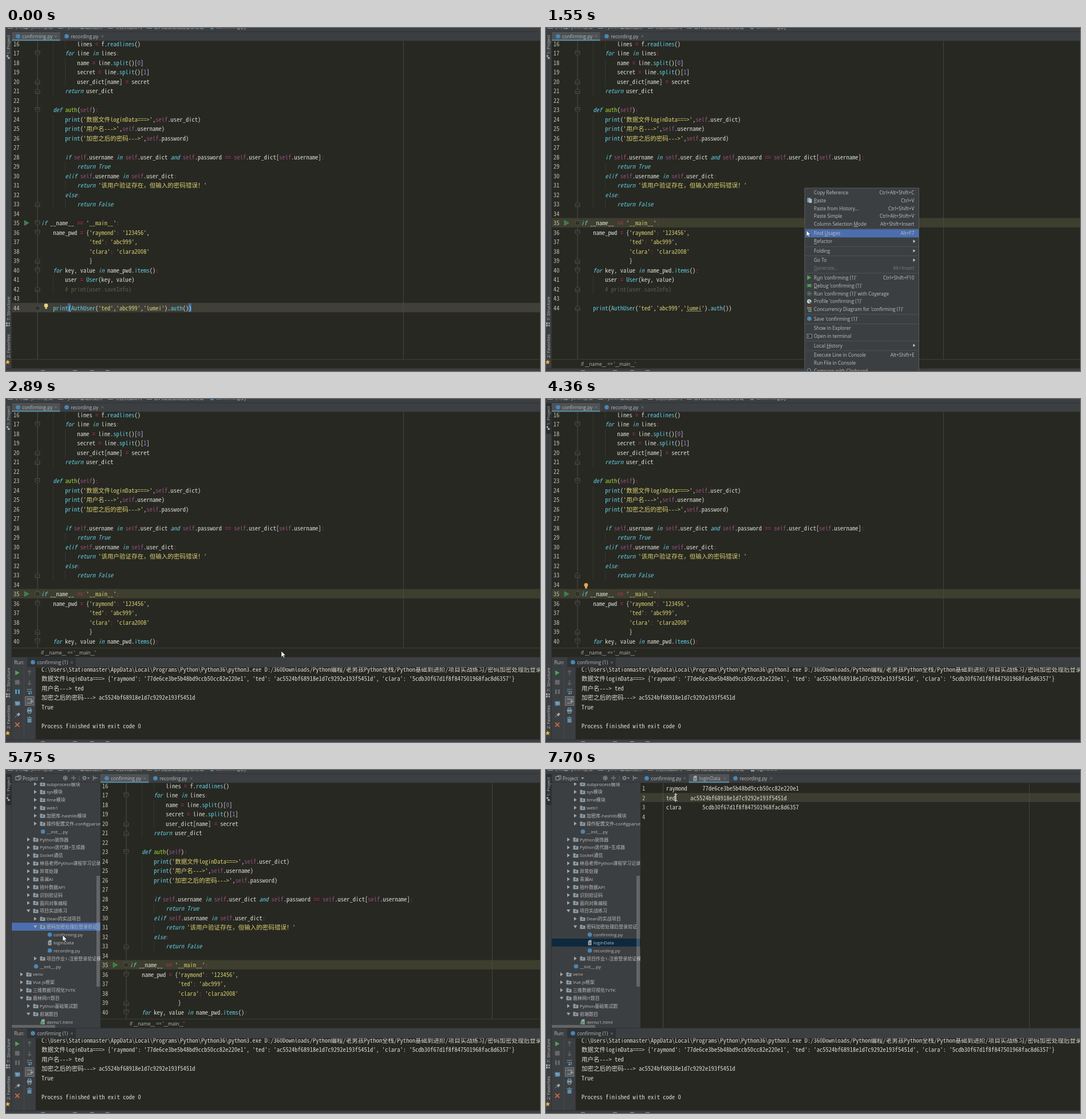
Write an HTML page that moves like this. It is 933 px wide and 600 px high and loops after 8000 ms.

```html
<!DOCTYPE html>
<html>
<head>
<meta charset="utf-8">
<title>Editor session</title>
<style>
html, body { margin: 0; width: 100%; height: 100%; overflow: hidden; background: #272822; }
svg { display: block; width: 100vw; height: 100vh; }
text { white-space: pre; }
.mono { font: 10.54px "Noto Sans Mono CJK SC", "Noto Sans Mono CJK JP", "Noto Sans CJK SC", monospace; }
.ui { font: 8.3px "Open Sans", "Noto Sans CJK SC", "Noto Sans CJK JP", sans-serif; }
.tree { font-size: 8px; }
.side { font-size: 7.8px; }
.kw { fill: #62cbe0; font-style: italic; }
.fn { fill: #62cbe0; }
.def { fill: #9cd32e; }
.self { fill: #94507f; }
.str { fill: #d8ce70; }
.num { fill: #a67be8; }
.op { fill: #e0286a; }
.com { fill: #5d5b50; }
.u { text-decoration: underline; }
</style>
</head>
<body>
<svg id="stage" viewBox="0 0 933 600"></svg>
<script>
const BG = '#272822', PANEL = '#3c3f41', CW = 5.27, LH = 16.5;
const INK = '#dcdcd4', ICON = '#9aa7b0', GREEN = '#4aa657', EDGE = '#2e3032';
const rect = (x, y, w, h, fill, more = '') =>
  `<rect x="${x}" y="${y}" width="${w}" height="${h}" fill="${fill}" ${more}/>`;
const dot = (x, y, r, fill, more = '') => `<circle cx="${x}" cy="${y}" r="${r}" fill="${fill}" ${more}/>`;
const path = (d, stroke, fill = 'none', w = 1) =>
  `<path d="${d}" stroke="${stroke}" fill="${fill}" stroke-width="${w}"/>`;
const label = (x, y, s, fill = '#bbbbbb', cls = '', anchor = 'start') =>
  `<text class="ui ${cls}" x="${x}" y="${y + 3}" fill="${fill}" text-anchor="${anchor}">${s}</text>`;
const mono = (x, y, s, fill = INK) => `<text class="mono" x="${x}" y="${y + 3.8}" fill="${fill}">${s}</text>`;
const group = (id, body) => `<g id="${id}">${body}</g>`;
const cross = (x, y, r, c, w = 0.8) => path(`M${x - r} ${y - r}l${2 * r} ${2 * r}m0 ${-2 * r}l${-2 * r} ${2 * r}`, c, 'none', w);
const play = (x, y, r, c, stroke = 'none') => path(`M${x - r} ${y - r * 1.15}l${2 * r} ${r * 1.15}l${-2 * r} ${r * 1.15}z`, stroke, c);
const lineY = n => 341.3 + (n - 35) * LH;

// ---- code ----
const source = `            lines = f.readlines()
        for line in lines:
            name = line.split()[0]
            secret = line.split()[1]
            user_dict[name] = secret
        return user_dict

    def auth(self):
        print('数据文件loginData===>',self.user_dict)
        print('用户名--->',self.username)
        print('加密之后的密码--->',self.password)

        if self.username in self.user_dict and self.password == self.user_dict[self.username]:
            return True
        elif self.username in self.user_dict:
            return '该用户验证存在，但输入的密码错误！'
        else:
            return False

if __name__ == '__main__':
    name_pwd = {'raymond': '123456',
                'ted': 'abc999',
                'clara': 'clara2008'
                }
    for key, value in name_pwd.items():
        user = User(key, value)
        # print(user.saveInfo)

    print(AuthUser('ted','abc999','lumei').auth())`.split('\n');

const kinds = ['com', 'str', 'kw', 'self', 'def', 'fn', 'num', 'op'];
const token = /(#.*)|('[^']*')|\b(for|in|return|def|if|elif|else|and|True|False)\b|\b(self)\b|(auth(?=\(self))|(\w+(?=\())|\b(\d+)\b|(=+|:)/g;
const paint = s => s.replace(token, (m, ...g) =>
  `<tspan class="${kinds[g.slice(0, 8).findIndex(v => v !== undefined)]}">${m}</tspan>`);

const foldStart = [17, 23, 35, 36, 40], foldEnd = [20, 21, 33, 39, 42, 44];
const fold = (n, k) => {
  const y = lineY(n);
  return path(`M51 ${y - 4 * k}h8v${5 * k}l-4 ${3 * k}l-4 ${-3 * k}zM53 ${y - k}h4`, '#5d5e56', BG, 0.8);
};
const guide = (x, a, b) => rect(x, lineY(a) - 8, 0.8, (b - a + 1) * LH, '#3a3b34');
const bulb = (id, y, c) => group(id, dot(70, y - 1.5, 3.4, c) + rect(68.3, y + 1.5, 3.4, 3, '#b9b9b0'));

const code = rect(10, 22, 923, 578, BG) +
  rect(54.7, 22, 0.8, 558, '#55564f') +
  rect(10, 0, 923, 16.4, '#3e3d32', 'id="band"') +
  guide(82, 16, 21) + guide(103, 16, 16) + guide(103, 18, 20) + guide(82, 24, 33) +
  [29, 31, 33].map(n => guide(103, n, n)).join('') + guide(82, 41, 42) +
  rect(694, 22, 0.8, 558, '#4b4c46') +
  group('braces', rect(107.8, 481.5, 5.4, 15, '#3a6d9c') + rect(318.5, 481.5, 5.4, 15, '#3a6d9c')) +
  source.map((s, i) => mono(13, lineY(16 + i), 16 + i, '#c0c0b8') + mono(61.2, lineY(16 + i), paint(s))).join('') +
  foldStart.map(n => fold(n, 1)).join('') + foldEnd.map(n => fold(n, -1)).join('') +
  play(36, 341, 3.7, '#3b7a4a', '#4c8f5a') +
  group('typo', path('M245 495.5h27', '#a3a382', 'none', 0.8)) +
  bulb('bulbA', 487, '#e8d67a') + bulb('bulbB', 327, '#f0a83c') +
  rect(197.2, 333, 1.2, 15.5, '#f8f8f0', 'id="caret"');

const hashes = ['77de6ce3be5b48bd9ccb50cc82e220e1', 'ac5524bf68918e1d7c9292e193f5451d', '5cdb30f67d1f8f847501968fac8d6357'];
const users = ['raymond', 'ted', 'clara'];
const tabbed = s => s.padEnd((Math.floor(s.length / 4) + 1) * 4 + 4);
const login = rect(10, 22, 923, 430, BG) + rect(10, 40.3, 923, 15.8, '#3e3d32') +
  rect(49.3, 22, 0.8, 430, '#55564f') + rect(689, 22, 0.8, 430, '#4b4c46') +
  [0, 1, 2, 3].map(i => mono(13, 32.4 + i * LH, i + 1, '#c0c0b8')).join('') +
  users.map((u, i) => mono(55, 32.4 + i * LH, tabbed(u) + hashes[i])).join('') +
  rect(55 + 3 * CW, 40.5, 1.1, 15, '#f8f8f0', 'id="caretB"');

// ---- tabs and breadcrumb ----
const page = (x, y) => path(`M${x - 3} ${y - 2}l2 -2.5h4v9h-6z`, 'none', ICON) + path(`M${x - 1.5} ${y}h3m-3 2h3`, PANEL, 'none', 0.8);
const py = (x, y) => dot(x, y, 3.8, '#4b86b4');
const tab = (x, w, name, icon) => icon(x + 11, 14.5) + label(x + 18.3, 14.5, name) + cross(x + w - 7.5, 14.5, 1.8, '#7f8385');
const active = (id, x, w) => group(id, rect(x, 7, w, 15, '#4e5254') + rect(x, 20.3, w, 2, '#5b91aa'));
const tabs = rect(10, 6, 923, 17, PANEL) + rect(10, 22, 923, 1, EDGE) +
  active('onCode', 10, 84.5) + active('onLogin', 94.5, 70.5) +
  tab(10, 84.5, 'confirming.py', py) + group('tabLogin', tab(94.5, 70.5, 'loginData', page)) +
  group('tabRec', tab(95, 81, 'recording.py', py));
const crumb = rect(10, 579.5, 923, 21, BG) + rect(10, 579.3, 923, 0.8, '#44453f') +
  group('crumbText', label(61, 588, "if __name__ == '__main__'"));

// ---- project panel ----
const rows = `3>subprocess模块|3>sys模块|3>time模块|3>web1|3>加密库-hashlib模块|3>操作配置文件-configparser模块|3p__init__.py|2>Python装饰器|2>Python迭代器+生成器|2>Socket通信|2>林岳老师Python课程学习记录|2>异常处理|2>青澜AI|2>拾叶数据API|2>识别验证码|2>面向对象编程|2v项目实战练习|3>Dean的实战项目|3v密码加密处理后登录验证|4pconfirming.py|4floginData|4precording.py|3>项目作业1-注册登录验证模块|2p__init__.py|1>venv|1>Vue.js框架|1>三维数据可视化TVTK|1v鹿林网IT题目|2>Python基础笔试题|2v前端题目|3hdemo1.html`.split('|');
const rowY = i => 24.5 + 13.87 * i;
const folder = (x, y) => path(`M${x - 4.5} ${y - 3.5}h3.5l1 1.3h4.5v6h-9z`, 'none', '#8f9ba3') + rect(x - 1.3, y - 0.8, 2.6, 2.4, '#4f5a62');
const icons = { p: py, f: page, h: (x, y) => page(x, y) + rect(x - 4.5, y, 6, 4, '#4f9f5c') };
const treeRow = (s, i) => {
  const x = 35 + 12 * s[0], y = rowY(i), k = s[1];
  const arrow = k === '>' ? `M${x - 22} ${y - 3.3}l4.8 3.3l-4.8 3.3z` : `M${x - 23} ${y - 2.3}h6.4l-3.2 4.8z`;
  return (icons[k] ? icons[k](x - 6.5, y) : path(arrow, 'none', '#a4a8aa') + folder(x - 7, y)) +
    label(x, y, s.slice(2), '#bbbbbb', 'tree');
};
const bar = 'rgba(255,255,255,.2)';
const project = rect(10, 6, 155, 446, PANEL) + rect(10, 0, 155, 13.9, '#4b6eaf', 'id="pick"') +
  rows.map(treeRow).join('') +
  rect(158, 185, 6, 194, bar) + rect(10, 446, 76, 5, bar) +
  rect(10, 6, 155, 15.5, PANEL) + rect(10, 21, 155, 0.8, EDGE) +
  path('M17 11.5h6v6h-6zM20 10h6v6h-3', ICON) + label(29, 14.5, 'Project') +
  path('M61.5 13h5l-2.5 3.2z', 'none', '#a4a8aa') +
  dot(103.5, 14, 3.4, 'none', `stroke="${ICON}"`) + path('M101 14h5m-2.5 -2.5v5M114 14h8M118 10v2.5m0 3v2.5', ICON) +
  path('M128 10.5v8', '#5c6062') + dot(137, 14, 2.5, 'none', `stroke="${ICON}" stroke-width="2" stroke-dasharray="1.5 .6"`) +
  path('M142 13.3h4l-2 2.4z', 'none', ICON) + path('M152.5 10v8m1.5 -4h6m-4 -2l-2 2l2 2', ICON);

// ---- run panel ----
const dict = `{${users.map((u, i) => `'${u}': '${hashes[i]}'`).join(', ')}}`;
const output = [
  String.raw`C:\Users\Stationmaster\AppData\Local\Programs\Python\Python36\python3.exe D:/360Downloads/Python编程/老男孩Python全栈/Python基础到进阶/项目实战练习/密码加密处理后登录验证/confirming.py`,
  '数据文件loginData===> ' + dict, '用户名---> ted', '加密之后的密码---> ' + hashes[1], 'True', '', 'Process finished with exit code 0'];
const vert = (x, y, k) => path(`M${x} ${y - 4}v8M${x - 3} ${y + k}l3 ${3 * k}l3 ${-3 * k}`, '#63676a', 'none', 1.4);
const run = rect(10, 451, 923, 149, BG) +
  group('out', output.map((s, i) => mono(62, 472.8 + i * LH, s)).join('')) +
  rect(10, 451.5, 923, 18, PANEL) + rect(10, 451, 923, 1, EDGE) +
  rect(10, 469, 42, 127, PANEL) + rect(31, 470, 0.8, 126, '#4b4f51') + rect(51.5, 469, 0.8, 127, EDGE) +
  label(14.5, 460.5, 'Run:') + rect(37, 452, 85, 17, '#303335') + py(47, 460.5) +
  label(54.5, 460.5, 'confirming (1)') + cross(115, 461, 1.8, '#7f8385') +
  play(20, 479, 3.8, GREEN) + rect(15.8, 491.5, 8, 8, '#666a6c', 'id="stop"') +
  '<path id="pause" d="M16 508h3v8h-3zM21 508h3v8h-3z"/>' +
  rect(15.5, 528.5, 9, 8, '#4e7f9b') + path('M16 531h8m-5 0v5m1 -2.5h4', '#c3ccd0', 'none', 0.8) +
  path('M16 556.5l3 -3m-1 -3l4 4m0 -5.5l2.5 2.5l-3 3l-2 -2z', ICON, ICON) +
  cross(19.8, 569.8, 3.6, '#d06b45', 1.7) +
  vert(41, 479, -1) + vert(41, 496, 1) +
  path('M36.5 508h9m-9 3.5h8v3.5h-5m2 -2l-2 2l2 2', '#6e9cb5', 'none', 1.2) +
  rect(33.8, 520.5, 15, 15.5, '#55595c', 'stroke="#8b8f92" stroke-width=".8"') +
  path('M37 525h8v5m-2.5 -2l2.5 2.5l2.5 -2.5M37 532h8', '#a8b1b7', 'none', 1.1) +
  rect(36.8, 543, 8.5, 4, '#6e9cb5') + path('M38.5 543v-2.5h5v2.5M38.5 547v2.5h5v-2.5', ICON) +
  rect(37.5, 559, 7, 7, '#5f8fab') + path('M36.5 557.5h9m-6 -1.5h3', '#6e9cb5', 'none', 1.2);

// ---- frame ----
const side = (y, s) => `<text class="ui side" fill="#bbbbbb" transform="translate(6.5 ${y}) rotate(-90)">${s}</text>`;
const nav = rect(0, 0, 933, 6.5, PANEL) + rect(0, 6, 933, 0.8, EDGE) +
  [[15, '小木屋Python全栈'], [103, 'Python基础到进阶'], [190, '项目实战练习'], [258, '密码加密处理后登录验证']]
    .map(([x, s]) => rect(x - 12, -3, 9, 4, '#8f9ba3') + label(x, -1.8, s, '#bbbbbb', 'tree')).join('') +
  group('navCode', py(360, -1.5) + label(367, -1.8, 'confirming.py')) +
  group('navLogin', page(361, -2) + label(367, -1.8, 'loginData'));
const strip = rect(0, 6, 10, 594, PANEL) + rect(0, 7, 9.5, 54, '#2b2e30', 'id="hover"') + rect(9.3, 6.5, 0.8, 590, EDGE) +
  side(46, '1: Project') + rect(1, 47.5, 3, 3, ICON) + rect(3, 51, 3.5, 3, ICON) +
  side(512, '7: Structure') + [515, 519].map(y => rect(0, y, 3, 3, ICON) + rect(4, y, 3, 3, '#7f8b93')).join('') +
  side(577, '2: Favorites') +
  path('M3 580l1.2 2.7l2.9 .3l-2.2 2l.7 2.9l-2.6 -1.5l-2.6 1.5l.7 -2.9l-2.2 -2l2.9 -.3z', 'none', '#e3b341') +
  rect(0, 595.5, 933, 5, PANEL) + rect(0, 595, 933, 0.8, EDGE) +
  [64, 120, 150, 177].map(x => rect(x - 3, 598.8, 7, 1.2, '#8f9396')).join('');

// ---- context menu: y, label, shortcut or '>' ----
const items = [
  [287.5, 'Copy Reference', 'Ctrl+Alt+Shift+C'], [301.5, '_Paste', 'Ctrl+V'],
  [315.5, 'Paste from History...', 'Ctrl+Shift+V'], [329.3, 'Paste Simple', 'Ctrl+Alt+Shift+V'],
  [343, 'Column Selection _Mode', 'Alt+Shift+Insert'], [359.3, 'Find _Usages', 'Alt+F7'],
  [373.3, '_Refactor', '>'], [390, 'Folding', '>'], [406.3, 'Go To', '>'], [420.3, '_Generate...', 'Alt+Insert'],
  [436.8, "R_un 'confirming (1)'", 'Ctrl+Shift+F10'], [450.6, "_Debug 'confirming (1)'"],
  [464.5, "Run 'confirming (1)' with Co_verage"], [478.3, "Profile 'confirming (1)'"],
  [492.2, "Concurrency Diagram for 'confirming (1)'"], [508.6, "Save 'confirming (1)'"],
  [525, 'Show in Explorer'], [539, 'Open in terminal'], [555.5, 'Local _History', '>'],
  [572, 'Execute Line in Console', 'Alt+Shift+E'], [586, 'Run File in Console'], [600, 'Compare with Clip_board']];
const menuItem = ([y, s, key]) => {
  const c = s === '_Generate...' ? '#777777' : '#c0c0c0';
  return label(468, y, s.replace(/_(.)/, '<tspan class="u">$1</tspan>'), c) +
    (key === '>' ? path(`M641.5 ${y - 3}l4 2.8l-4 2.8z`, 'none', c) : key ? label(643.5, y, key, c, '', 'end') : '');
};
const menu = rect(452, 280, 199.5, 330, PANEL, 'stroke="#5b5e60"') +
  rect(452.5, 0, 198.5, 14, '#4b6eaf', 'id="menuPick"') +
  [351, 382, 398, 428.5, 500.5, 517, 547.3, 563.7].map(y => rect(453, y, 198, 0.8, '#545759')).join('') +
  items.map(menuItem).join('') +
  rect(456.5, 297, 6, 8, '#7d9db0') + rect(459.5, 299, 5, 7, '#b0bcc3') +
  play(460, 436.5, 3.6, GREEN) +
  dot(460, 450.5, 2.8, '#4f9f5c') + path('M456 447.5l8 6m0 -6l-8 6M455.5 450.5h9', '#4f9f5c') +
  dot(460, 464.5, 3.5, 'none', 'stroke="#8f9ba3" stroke-dasharray="1 .7"') + play(460.5, 464.5, 2, GREEN) +
  dot(459.8, 478.3, 3.8, '#c9cdcf') + path('M460 476v2.5l2 1', '#4c5052') + play(462, 480.5, 1.8, GREEN) +
  ['#c9744f', '#4f9f5c', '#5b9bbd'].map((c, i) => rect(456 + i, 488.5 + 3 * i, 8 - i, 2, c)).join('') +
  py(460, 508.5) + rect(456, 535.5, 8.5, 7, '#2d3032', `stroke="${ICON}" stroke-width=".8"`) +
  path('M457.5 537.5l2 1.5l-2 1.5', '#c0c0c0', 'none', 0.8) + dot(459.5, 599, 3.2, 'none', 'stroke="#7d9db0"');

const pointer = group('arrow', path('M0 0v10.5l2.5 -2.3l1.6 3.8l1.8 -.8l-1.6 -3.6h3.3z', '#222222', '#ffffff', 0.7)) +
  group('beam', path('M-2.6 -5.5h2l.6 .6l.6 -.6h2M0 -5v10M-2.6 5.5h2l.6 -.6l.6 .6h2', '#e0e0dc', 'none', 0.9));

stage.innerHTML = group('project', project) +
  group('editor', group('code', code + group('crumb', crumb)) + group('login', login) + tabs) +
  group('run', run) + nav + strip + group('menu', menu) + pointer;

// ---- timeline: start, end, steps, way points ----
const moves = [
  [220, 680, 7, [[782, 520], [700, 462], [540, 375], [454, 340]]],
  [1240, 1240, 1, [[452, 339]]],
  [1550, 1940, 6, [[455, 354], [470, 400], [480, 440]]],
  [2170, 2170, 1, [[482, 440]]],
  [2260, 2260, 1, [[481, 441]]],
  [3270, 4050, 11, [[478, 446], [425, 480], [250, 350], [90, 190], [16, 102]]],
  [4140, 4360, 4, [[8, 80], [3, 42], [-14, 32]]],
  [4740, 5520, 11, [[-4, 36], [40, 120], [78, 220], [92, 272]]],
  [5600, 6060, 7, [[95, 280], [99, 289], [99, 296], [99, 302]]],
  [6530, 7300, 11, [[104, 295], [170, 190], [235, 90], [258, 49]]],
  [7370, 7530, 3, [[252, 48.5], [229, 48.5]]],
  [7700, 7700, 1, [[227, 48]]]];

function cursorAt(t) {
  const move = moves.filter(m => t >= m[0]).pop();
  if (!move) return [-40, -40];
  const [a, b, n, pts] = move;
  if (n === 1) return pts[0];
  const i = Math.min(n - 1, Math.floor((t - a + 5) / ((b - a) / (n - 1))));
  let u = i / (n - 1);
  if (n === 11) u = u * u * (3 - 2 * u);
  const s = u * (pts.length - 1), k = Math.min(pts.length - 2, Math.floor(s));
  return pts[k].map((v, j) => v + (pts[k + 1][j] - v) * (s - k));
}

const el = id => document.getElementById(id);
const show = (id, on) => el(id).style.display = on ? '' : 'none';
const set = (id, name, value) => el(id).setAttribute(name, value);
const within = (t, a, b) => t >= a && t < b;

function render(t) {
  const moved = t >= 1150, running = t >= 2260, opened = t >= 4740, data = t >= 6290;
  const menuOn = within(t, 1240, 2170);
  set('band', 'y', moved ? 332.4 : 480.9);
  set('band', 'fill', moved ? '#3e3e2f' : '#403f38');
  show('braces', !moved);
  show('bulbA', !moved);
  show('typo', moved);
  show('bulbB', within(t, 4360, 4740));
  show('caret', within(t, 1150, 1240) || within(t, 2170, 2730) || within(t, 4220, 4360));
  show('caretB', t >= 7700);
  show('crumbText', t >= 1390);
  set('crumb', 'transform', `translate(0 ${running ? -144 : 0})`);

  show('run', running);
  show('out', t >= 2890);
  set('stop', 'fill', within(t, 2730, 2890) ? '#c75450' : '#666a6c');
  set('pause', 'fill', t < 2960 ? '#4a9cc4' : '#666a6c');

  show('project', opened);
  show('hover', t >= 4220);
  set('editor', 'transform', `translate(${opened ? 155 : 0} 0)`);
  set('pick', 'y', rowY(t < 6060 ? 18 : 20) - 7);
  set('pick', 'fill', data ? '#0d293e' : '#4b6eaf');
  for (const id of ['login', 'onLogin', 'tabLogin']) show(id, data);
  show('code', !data);
  show('onCode', !data);
  set('tabRec', 'transform', `translate(${data ? 70 : 0} 0)`);
  show('navCode', t < 6530);
  show('navLogin', t >= 6530);

  const [x, y] = cursorAt(t);
  show('menu', menuOn);
  show('menuPick', t >= 1550);
  const hit = items.filter(r => r[0] - 7.5 <= y).pop();
  if (hit) set('menuPick', 'y', hit[0] - 7);

  const bottom = !running ? 580 : data ? 451 : 436;
  const inEditor = x > (opened ? 165 : 10) && y > 23 && y < bottom;
  const inConsole = running && x > 52 && y > 469;
  const beam = !menuOn && (inEditor || inConsole);
  show('beam', beam);
  show('arrow', !beam);
  set(beam ? 'beam' : 'arrow', 'transform', `translate(${x} ${y})`);
}

function tick() {
  render(performance.now() % 8000);
  requestAnimationFrame(tick);
}
tick();
</script>
</body>
</html>
```
